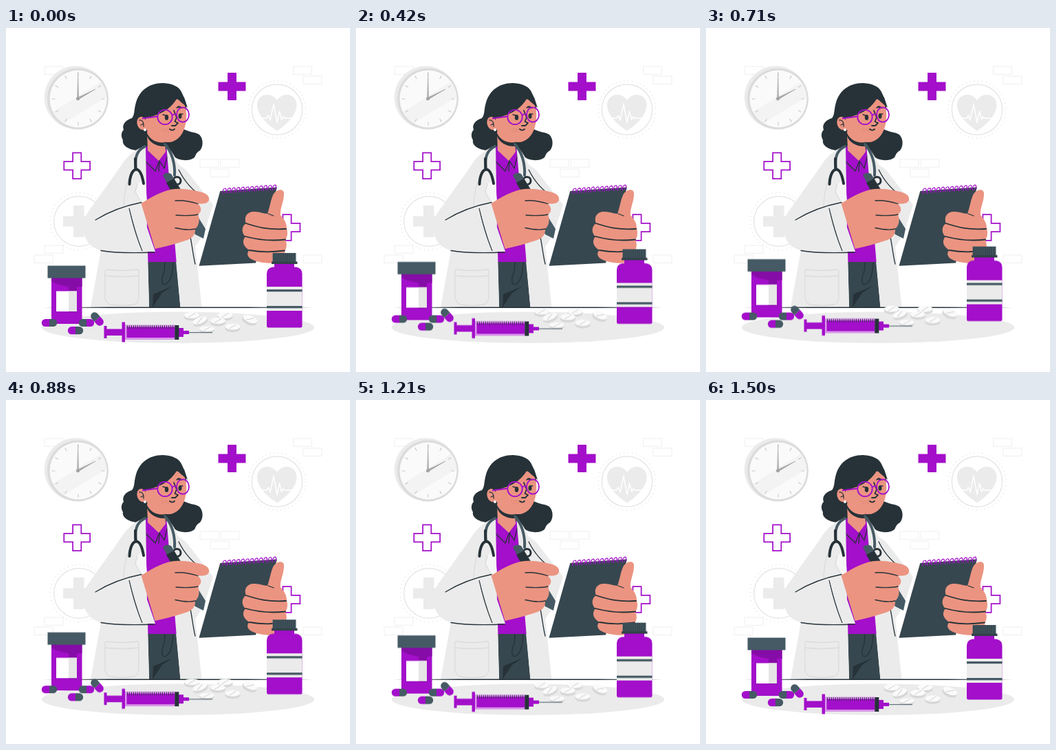
Write an HTML page that moves like this. It is 500x500 px and loops after 1.54 s.

```html
<!DOCTYPE html>
<html lang="en">
<head>
<meta charset="utf-8">
<title>Doctor with notepad</title>
<style>
  html, body { margin: 0; width: 100%; height: 100%; overflow: hidden; background: #fff; }
  svg { display: block; width: 100vw; height: 100vh; }
  .p { fill: #a30fca; }
  .s { fill: #455a64; }
  .slate { fill: #37474f; }
  .d { fill: #263238; }
  .g { fill: #ebebeb; }
  .skin { fill: #eb9481; }
  .w { fill: #fff; }
  .ln { fill: none; stroke: #263238; stroke-width: 1.3; stroke-linecap: round; stroke-linejoin: round; }
  .bold { stroke-width: 1.8; }
  .gl { fill: none; stroke: #dcdcdc; stroke-width: 1.3; }
  .pl { fill: none; stroke: #a30fca; stroke-width: 1.8; }
  .thin { stroke-width: 1.2; }
  .float { animation: float 1540ms -5ms infinite steps(18, jump-none); }
  @keyframes float {
    0%, 97.4026%, 100% { transform: translateY(0); }
    48.7013% { transform: translateY(-9.44px); }
  }
</style>
</head>
<body>
<svg viewBox="0 0 500 500">
  <defs>
    <path id="plus" d="M-6.3-19.5H6.3V-6.3H19.5V6.3H6.3V19.5H-6.3V6.3H-19.5V-6.3H-6.3Z"/>
    <rect id="brick" width="27" height="11.3" fill="none" stroke="#ececec" stroke-width=".8"/>
    <path id="ring" class="pl thin" d="M0 4C-1 0 1-4 3.6-4C6-3.5 5 2 2.5 2.6"/>
    <g id="capsule">
      <path class="p" d="M0-5.6H-5.6A5.6 5.6 0 0 0-5.6 5.6H0Z"/>
      <path class="s" d="M0-5.6H5.6A5.6 5.6 0 0 1 5.6 5.6H0Z"/>
    </g>
    <g id="tablet">
      <path fill="#d6d6d6" d="M-11-1V2A11 5 0 0 0 11 2V-1Z"/>
      <ellipse cy="-1" rx="11" ry="4.6" fill="#fafafa"/>
      <path d="M-5 2L5-4" stroke="#cfcfcf" fill="none"/>
    </g>
    <clipPath id="face"><circle cx="105" cy="103" r="41.5"/></clipPath>
  </defs>

  <!-- wall -->
  <use href="#brick" x="56" y="56"/><use href="#brick" x="417.5" y="56"/>
  <use href="#brick" x="432" y="70"/><use href="#brick" x="282" y="191"/>
  <use href="#brick" x="312" y="191"/><use href="#brick" x="297" y="205"/>
  <use href="#brick" x="41" y="330"/><use href="#brick" x="56" y="316"/>
  <use href="#brick" x="432" y="330"/>

  <!-- clock -->
  <circle class="g" cx="101.5" cy="101" r="45.7"/>
  <circle cx="104.5" cy="103" r="44.5" fill="#dbdbdb"/>
  <circle cx="105" cy="103" r="41.5" fill="#fafafa"/>
  <path clip-path="url(#face)" fill="#f3f3f3" d="M60 127L150 71V98L74 144Z"/>
  <circle cx="105" cy="103" r="36" fill="none" stroke="#c9c9c9" stroke-width="5" pathLength="120" stroke-dasharray=".6 9.4" stroke-dashoffset=".3"/>
  <path fill="#b5b5b5" d="M103 104L104.3 64.5H105L106.2 104ZM103.5 101L130.5 88.5L105 104.5Z"/>
  <path d="M104.5 103L130 89" stroke="#8f8f8f" stroke-width=".7"/>
  <circle cx="104.5" cy="102.7" r="2.5" fill="#a3a3a3"/>

  <!-- badges and crosses -->
  <g fill="none" stroke="#e3e3e3">
    <g stroke-width="1.2">
      <circle cx="394" cy="118.5" r="36.7"/><circle cx="106" cy="281" r="36.3"/>
    </g>
    <g stroke-width="1.4" stroke-linecap="round" stroke-dasharray=".1 5.9">
      <circle cx="394" cy="118.5" r="41.7"/><circle cx="106" cy="281" r="41.7"/>
    </g>
  </g>
  <path class="g" d="M394 149.5C381 141 365 127 365 112C365 95 386 92 394 105C402 92 422.5 95 422.5 112C422.5 127 407 141 394 149.5Z"/>
  <path d="M370 131H379L381.500 127L384 134L389 110.500L394 137.500L397.500 121L400.500 133L403 129L405 131H418" fill="none" stroke="#fff" stroke-width="1.5" stroke-linejoin="round"/>
  <path class="g" d="M98 258H113.500V273.500H129V288.500H113.500V304H98V288.500H83V273.500H98Z"/>
  <use href="#plus" class="p" transform="translate(328.5 85) scale(1.025)"/>
  <use href="#plus" class="pl" transform="translate(103.2 200.2) scale(.97)"/>
  <use href="#plus" class="pl" transform="translate(408.5 290) scale(.97)"/>

  <!-- hair -->
  <path class="d" d="M228 80C207 80 193 92 188.500 110C186 119 187 127 183 131C174 134 168 140 171 148C167 152 167 158 170 163C168 171 180 178 193 178C200 179 204 174 207 170L228 172C231 183 238 188 246 188C252 193 268 194 274 188C276 185 276 181 282 178C287 172 287 161 281 155C275 151 268 152 258 147L262 114C261 106 258 99 256 95C252 85 243 81 228 80Z"/>

  <!-- trousers, shirt, neck -->
  <path class="slate" d="M206 338H247L253.500 406H208Z"/>
  <path class="d" d="M214 387L242 375L227 385L213 406Z"/>
  <path class="ln" d="M243 341C242 356 240 367 233 372C227 375 224 368 230 354L231 341"/>
  <path class="p" d="M199 176L207 171L234 176L241 200L248 340H204Z"/>
  <path class="skin" d="M205 150L206 178L222 193L232 180L231 160Z"/>
  <path class="d" d="M205 153C210 163 220 168 232 166L232 172C219 173 208 166 205 157Z"/>
  <path class="ln" d="M199 190L217 208L223 193L230 204L235 184M223 194L222 208"/>

  <!-- face -->
  <path class="skin" d="M203 128C215 125 234 120 246 103L256 105C263 115 264 130 260 144C256 157 247 167 234 166C219 165 209 157 204 147C196 152 188 142 191 133C194 127 200 128 203 134Z"/>
  <path class="d" d="M201 132C215 127 237 125 251 98L238 86L208 92L193 118Z"/>
  <path class="d" d="M247 100C251 106 257 109 264 116L259 101L250 92Z"/>
  <path d="M226 147H241M228 150H238" stroke="#c0695d" stroke-width=".8" stroke-dasharray="1 2.500"/>
  <path class="ln" d="M194 134C198 133 201 138 200 143M196 141L200 139"/>
  <circle class="w" cx="202" cy="148" r="1.900"/>
  <ellipse class="d" cx="233.500" cy="130" rx="2.700" ry="4"/>
  <ellipse class="d" cx="253" cy="128" rx="2.500" ry="3.800"/>
  <path class="ln" d="M228 126L232 127M257 125L253 125M223 121C226 117 231 116 235 117"/>
  <path class="d" d="M247 117C249 112 253 112 257 117L250 116Z"/>
  <path class="ln bold" d="M244 120L248 130L245.500 136L250 138L246 142L241 142M238 147C240 149 243 149 245 147"/>
  <g class="pl">
    <circle cx="231" cy="129.500" r="10.700"/>
    <ellipse cx="257" cy="126" rx="9" ry="10.700"/>
    <path d="M198 131.500L220.500 128.500M241.500 127Q244.500 124 248 126"/>
  </g>

  <!-- coat -->
  <path class="g" d="M203 171C190 175 176 185 166 202L119 268C110 281 110 295 116 306C121 317 130 321 138 323L123 406H208L206 325L217 325L205 290Z"/>
  <path class="g" d="M233 170C240 179 246 186 250 197C253 201 259 203 263 208L301 257L287 300L275 318L284.500 406H253.500L247 332Z"/>
  <path fill="#f5f5f5" d="M191 226L202 219L205 252L196 254L188 238Z"/>
  <path class="gl" d="M188 203C177 216 172 235 171 259M191 226L188 238L196 253"/>
  <path class="gl" d="M146 351Q168 354 191 351Q193 351 193 354V392Q192 401 185 402Q169 405 152 402Q145 400 144 392V354Q144 351 146 351ZM144 360Q168 363 193 360"/>
  <path class="ln" d="M130 279C151 266 174 258 197 253.500M138 323.500C165 328 193 327 216 326M251 206C259 222 270 236 287 246M268 304C271 319 272 331 275 343"/>
  <path class="d" d="M179 262C184 282 190 304 198 324C190 305 184 285 179 262Z" stroke="#263238" stroke-width=".8"/>

  <!-- stethoscope -->
  <g fill="none" stroke-linecap="round">
    <path d="M202 172C190 178 187 188 188.500 205M231 169C241 180 246 197 245 214" stroke="#455a64" stroke-width="4"/>
    <path d="M179.500 227C180 214 184 206 189.500 205.500C195 206 198 214 200 226M188 190L188.500 205" stroke="#263238" stroke-width="4"/>
    <circle cx="248.500" cy="222" r="5.500" stroke="#263238" stroke-width="3"/>
  </g>

  <!-- pen -->
  <path class="s" d="M228 214Q233 208 240 212L290 292L287 306L275 300Z"/>
  <path class="d" d="M233 225L244 219L253 234L241 239Z"/>

  <!-- notepad -->
  <path class="slate" d="M311.300 237L394 231.500L363 341.500L280.500 345.800Z"/>
  <g id="rings"></g>

  <!-- writing hand -->
  <path class="skin" d="M196.500 255C211 246 224 238 241 234.500C255 232 278 236 288 240C294 242 297 248 294 252C291 256 284 256 278 255C285 260 285 267 279 271C282 278 281 287 275 292C276 301 269 307 261 309C246 314 231 318 216.500 321Z"/>
  <path class="ln" d="M246 251C257 250 268 252 279 255.500M247 272C259 273 270 273 279 271M246 290.500C257 293 267 294 275 292"/>

  <!-- holding hand -->
  <path class="skin" d="M380 270C384 259 385 248 389 241C394 234 404 233 404 241C404 253 398 262 399 272C404 278 408 283 408 291C410 298 409 304 406 308C409 314 408 320 405 324C407 332 403 339 395 341C382 343 364 341 355 335C350 331 350 326 354 323C345 318 342 310 348 303C342 298 342 288 349 284C345 273 352 266 362 267C369 267 374 270 380 270Z"/>
  <path class="ln bold" d="M349 284C364 289 381 294 407 292M348 303C363 307 385 310 406 307.500M354 323C370 326 387 326 405 323.500"/>
  <path class="ln" d="M381 270L389 273"/>

  <!-- table -->
  <path class="d" d="M54 406.300L150 405.600H350L446 406.300L350 407H150Z"/>
  <ellipse class="g" cx="250" cy="435.300" rx="198" ry="22.700"/>

  <g class="float">
    <!-- pill jar -->
    <rect class="p" x="66" y="363" width="44.500" height="67"/>
    <path fill="#860ca7" d="M66 363H110.500V376H103V413H91V376Q76 374 66 368Z"/>
    <rect class="s" x="60.500" y="345.500" width="55" height="18"/>
    <rect class="w" x="73" y="382.500" width="30" height="29.500"/>
    <rect x="91" y="382.500" width="12" height="29.500" fill="#e6e6e6"/>

    <use href="#capsule" x="63" y="428.500"/>
    <use href="#capsule" transform="translate(117 428.5) rotate(180)"/>
    <use href="#capsule" x="101" y="439.700"/>
    <use href="#capsule" transform="translate(132.5 423) rotate(228)"/>

    <!-- tablets -->
    <use href="#tablet" x="270" y="418.500"/>
    <use href="#tablet" x="318.500" y="418.500"/>
    <use href="#tablet" transform="translate(282 426) rotate(-20)"/>
    <use href="#tablet" x="308" y="426.500"/>
    <use href="#tablet" transform="translate(354.5 424) rotate(22) scale(1 1.1)"/>
    <use href="#tablet" x="329.500" y="435"/>
    <use href="#tablet" transform="translate(292 438) scale(1 .8)"/>

    <!-- syringe -->
    <rect x="173" y="431.500" width="73" height="21.500" fill="#d795e8"/>
    <g class="p">
      <rect x="142.500" y="433" width="4" height="18"/>
      <rect x="146" y="437.500" width="23" height="9.500"/>
      <rect x="175.500" y="434.500" width="70" height="15.500"/>
      <rect x="168.500" y="427.500" width="4.500" height="29"/>
      <rect x="251" y="436" width="7" height="13"/>
      <rect x="258" y="440" width="8" height="5"/>
    </g>
    <path d="M176 434.500H244" stroke="#263238" stroke-width="5" stroke-dasharray=".8 2.200"/>
    <rect class="d" x="245.300" y="432" width="6" height="21"/>
    <path d="M266 442.700H300" stroke="#455a64" stroke-width="1"/>

    <!-- bottle -->
    <rect class="p" x="390" y="342" width="29" height="9"/>
    <path class="p" d="M387 347.500H422Q430.500 349 430.500 357V433Q430.500 435.500 428 435.500H381.500Q379 435.500 379 433V357Q379 349 387 347.500Z"/>
    <rect class="g" x="379" y="376" width="51.500" height="35"/>
    <path class="s" d="M379 380H430.500V383.300H379ZM379 404H430.500V407.300H379Z"/>
    <rect class="s" x="387.500" y="327" width="34" height="13"/>
    <path d="M389 333.500H421" stroke="#263238" stroke-width="12" stroke-dasharray=".9 2"/>
    <rect x="386" y="339.500" width="37.500" height="3.500" rx=".5" fill="#324149"/>
  </g>
</svg>
<script>
  const rings = document.getElementById('rings');
  for (let i = 0; i < 12; i++) {
    const ring = document.createElementNS('http://www.w3.org/2000/svg', 'use');
    ring.setAttribute('href', '#ring');
    ring.setAttribute('x', 315 + i * 6.6);
    ring.setAttribute('y', 237 - i * 0.45);
    rings.append(ring);
  }
</script>
</body>
</html>
```
